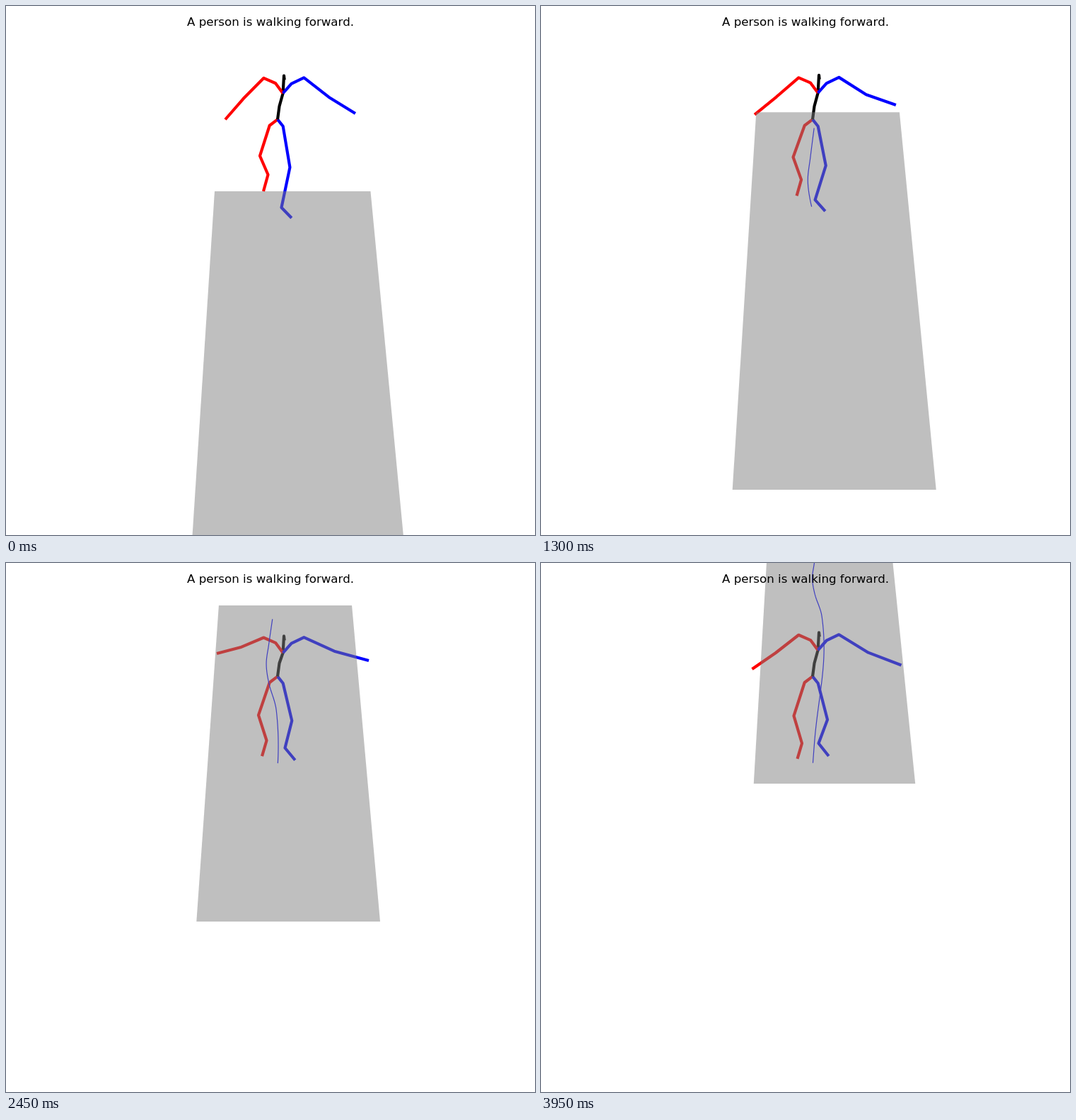
These frames come from a looping animation (748x748 px, 4000 ms). An HTML page with a canvas:

```html
<!DOCTYPE html>
<html lang="en">
<head>
<meta charset="utf-8">
<title>Walking figure</title>
<style>
  html, body { margin: 0; width: 100%; height: 100%; overflow: hidden; background: #fff; }
  canvas { display: block; width: 748px; height: 748px; }
</style>
</head>
<body>
<canvas id="stage" width="748" height="748"></canvas>
<script>
const ctx = document.getElementById('stage').getContext('2d');
const LOOP = 4000, STEP = 50;
const RED = '#f00', BLUE = '#00f', BLACK = '#000';

// Smooth curve through (ts, vs) with unevenly spaced times.
function curve(ts, vs, t) {
  const n = ts.length;
  if (t <= ts[0]) return vs[0];
  if (t >= ts[n - 1]) return vs[n - 1];
  let i = 0;
  while (t >= ts[i + 1]) i++;
  const slope = k => {
    const a = Math.max(k - 1, 0), b = Math.min(k + 1, n - 1);
    return (vs[b] - vs[a]) / (ts[b] - ts[a]);
  };
  const h = ts[i + 1] - ts[i], s = (t - ts[i]) / h, s2 = s * s, s3 = s2 * s;
  return (2 * s3 - 3 * s2 + 1) * vs[i] + (s3 - 2 * s2 + s) * h * slope(i) +
         (3 * s2 - 2 * s3) * vs[i + 1] + (s3 - s2) * h * slope(i + 1);
}

// ---- Ground: perspective with one vanishing point ----
const VX = 384, VY = -1116, WIDTH = .16, LENGTH = 2.342;
const ground = (x, depth) => {
  const u = 1e4 / depth;
  return [VX + x * u, VY + u];
};
const advance = t => curve(
  [0, 1000, 1650, 2450, 3500, 3950],
  [0, .495, .814, 1.246, 1.824, 2.088], t);
const sway = t => curve(
  [0, 500, 850, 1200, 1650, 2400, 3500, 3950],
  [.0643, .0602, .0577, .0609, .069, .0706, .061, .058], t);

// ---- Gait: hands and feet swing, the other joints follow them ----
const swing = (side, amp, lift) => t => {
  const a = (35 + .3 * t) * Math.PI / 180;
  return side * (amp * Math.sin(a)) - lift * Math.max(0, side * Math.cos(a));
};

const POSE = [0, 1000, 1650, 2450, 2900, 3500, 3950];
const limbEnd = (xs, ys, gait) => {
  const rest = ys.map((y, i) => y - gait(POSE[i]));
  return t => [curve(POSE, xs, t), curve(POSE, rest, t) + gait(t)];
};
const rHand = limbEnd([310, 308.5, 294.5, 298, 297.5, 310.5, 298.5],
  [160.5, 147.5, 147.5, 128, 140, 152, 150], swing(1, 5, 0));
const lHand = limbEnd([494, 497.5, 507.5, 513, 510.5, 502.5, 509.5],
  [152, 152, 138, 138, 146, 148.5, 144.5], swing(-1, 5, 0));
const rFoot = limbEnd([370.5, 372, 363.5, 368.5, 371, 366.5, 369],
  [238.5, 270, 248, 251, 249, 262.5, 255], swing(-1, 17, 7));
const lFoot = limbEnd([389.5, 388, 388, 394.5, 396.5, 391, 392.5],
  [285, 246, 268.5, 261.5, 267.5, 252, 255], swing(1, 17, 7));

function skeleton(t) {
  const [rhx, rhy] = rHand(t), [lhx, lhy] = lHand(t);
  const [rfx, rfy] = rFoot(t), [lfx, lfy] = lFoot(t);
  const sink = 2.7 * Math.sin(2 * Math.PI * (t - 1700) / 3900);
  const r = rfy - 253, l = lfy - 262;

  const pelvis = [384, 160.4];
  const chest = [391.6, 124.5 + sink];
  const neck = [393, 100 + 1.35 * sink];
  const fromChest = (dx, dy) => [chest[0] + dx, chest[1] + dy];

  return [
    [RED, pelvis, [372.7, 169], [rfx - 11.5, 215.6 + .25 * r],
      [rfx, rfy], [rfx - 6.5, rfy + 22 - .1 * r]],
    [BLUE, pelvis, [391.7, 170], [404.2 - .12 * l, 223 + .22 * l],
      [lfx, lfy], [lfx + 14.3, lfy + 17.2 - .11 * l]],
    [BLACK, pelvis, [386.5, 141.7], chest, neck, [neck[0] + .7, neck[1] + 6]],
    [RED, chest, fromChest(-10.5, -14.2), fromChest(-27.3, -21.5),
      [333 + .35 * (rhx - 302.5), 126 + .36 * (rhy - 146.5)], [rhx, rhy]],
    [BLUE, chest, fromChest(12, -13.5), fromChest(29.7, -22),
      [461 + .4 * (lhx - 505), 127 + .3 * (lhy - 145.6)], [lhx, lhy]]
  ];
}

function path(points) {
  ctx.beginPath();
  points.forEach(p => ctx.lineTo(p[0], p[1]));
}

function line(points, color, width) {
  path(points);
  ctx.strokeStyle = color;
  ctx.lineWidth = width;
  ctx.stroke();
}

function draw(t) {
  ctx.fillStyle = '#fff';
  ctx.fillRect(0, 0, 748, 748);
  ctx.lineJoin = 'round';

  for (const [color, ...points] of skeleton(t)) line(points, color, 4.17);

  const now = advance(t), x = sway(t);
  const trail = [];
  for (let k = 0; k < t; k += STEP) {
    trail.push(ground(sway(k) - x, 7.12 + now - advance(k)));
  }
  if (trail.length > 1) line(trail, BLUE, 1.2);

  // The half-clear floor tints everything beneath it.
  const far = 7.257 + now, near = far - LENGTH;
  const left = -x - .0003, right = left + WIDTH;
  path([ground(left, far), ground(right, far), ground(right, near), ground(left, near)]);
  ctx.fillStyle = 'rgba(128, 128, 128, .5)';
  ctx.fill();

  ctx.fillStyle = BLACK;
  ctx.font = '16.67px "DejaVu Sans", sans-serif';
  ctx.textAlign = 'center';
  ctx.fillText('A person is walking forward.', 374, 27.5);
}

const start = performance.now();
function tick() {
  const t = (performance.now() - start) % LOOP;
  draw(Math.floor(t / STEP) * STEP);
  requestAnimationFrame(tick);
}
tick();
</script>
</body>
</html>
```
